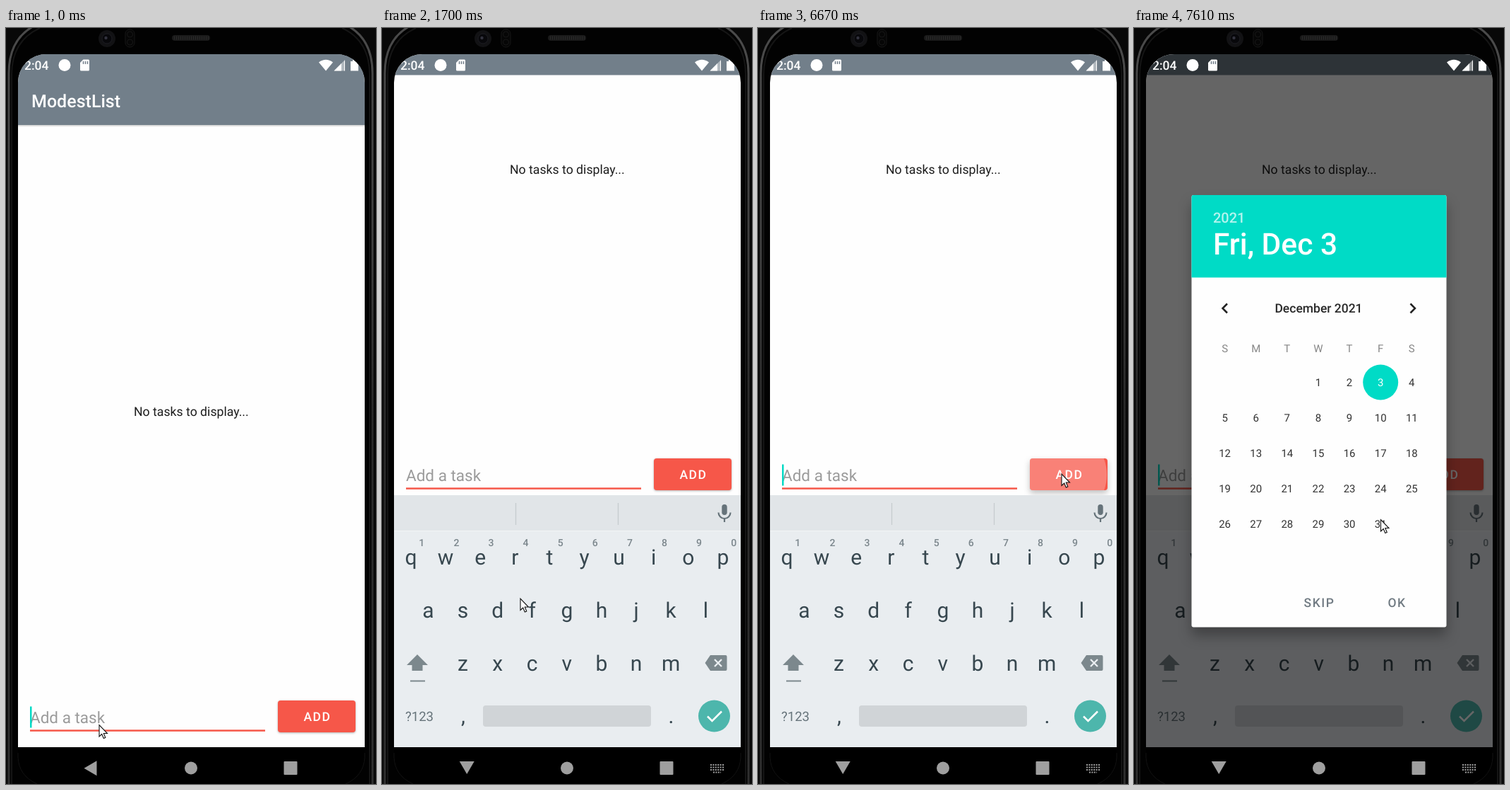
An HTML page for the animation above (8000 ms loop, 524 by 1068 pixels).

```html
<!DOCTYPE html>
<html lang="en">
<head>
<meta charset="utf-8">
<title>Task list demo</title>
<style>
  html, body { margin: 0; width: 100%; height: 100%; overflow: hidden; background: #000; }
  svg { display: block; width: 100vw; height: 100vh; }
  text { font-family: Roboto, "Noto Sans", sans-serif; white-space: pre; text-rendering: geometricPrecision; }
  .mid { text-anchor: middle; }
  .medium { font-weight: 500; }
  .button { font-size: 17.5px; font-weight: 500; letter-spacing: 1.56px; }
  .field { font-size: 22.5px; }
  .key { font-size: 30px; fill: #37474f; }
  .digit { font-size: 14px; font-weight: 500; fill: #7b868c; }
  .suggestion { font-size: 22.5px; fill: #7c878c; }
  .best { font-weight: 700; fill: #505c62; }
  .day { font-size: 15px; fill: #333; }
  .weekday { font-size: 15px; fill: #878787; }
  #addBox { filter: drop-shadow(0 1.5px 1.5px rgba(0,0,0,.3)); }
  #addBox.raised { filter: drop-shadow(0 4px 4px rgba(0,0,0,.25)); }
  #sheet { filter: drop-shadow(0 12px 9px rgba(0,0,0,.3)); }
</style>
</head>
<body>
<svg viewBox="0 0 524 1068" preserveAspectRatio="none">
  <defs>
    <clipPath id="screen"><path d="M17 1016V77A40 40 0 0 1 57 37H468A40 40 0 0 1 508 77V1016Z"/></clipPath>
    <clipPath id="addClip"><rect x="385" y="950" width="110" height="45" rx="4"/></clipPath>
    <linearGradient id="edge" x2="0" y2="1068" gradientUnits="userSpaceOnUse">
      <stop stop-color="#4a4a4a"/><stop offset=".3" stop-color="#404040"/>
      <stop offset=".5" stop-color="#2a2a2a"/><stop offset="1" stop-color="#303030"/>
    </linearGradient>
    <linearGradient id="toolbarShade" x2="0" y2="1">
      <stop stop-color="#000" stop-opacity=".2"/><stop offset="1" stop-opacity="0"/>
    </linearGradient>
  </defs>

  <!-- Phone body -->
  <rect width="524" height="1068" fill="#080808"/>
  <path d="M4 1080V64Q4 12 46 -6H478Q519 12 519 64V1080" fill="#020202" stroke="url(#edge)" stroke-width="3"/>
  <path d="M8 1080V66Q8 18 48 0M515 1080V66Q515 18 476 0" fill="none" stroke="#151515" stroke-width="2"/>
  <circle cx="143" cy="15" r="12" fill="#121214"/>
  <circle cx="143" cy="15" r="7" fill="#08080b" stroke="#1d1d23"/>
  <circle cx="141.5" cy="14" r="2.2" fill="#32323e"/>
  <rect x="169" y="2" width="13" height="25" rx="6" fill="#060606" stroke="#161616"/>
  <circle cx="175.5" cy="9" r="4" fill="none" stroke="#181818"/>
  <circle cx="175.5" cy="20" r="4" fill="none" stroke="#181818"/>
  <rect x="235" y="10" width="54" height="8" rx="4" fill="#1a1a1a"/>
  <path d="M238 14H287" stroke="#2a2a2a" stroke-width="5" stroke-dasharray="1 2"/>
  <path d="M17 1016V1030Q18 1056 44 1068H481Q507 1056 508 1030V1016Z" fill="#000"/>
  <path d="M17 1024V1030Q18 1056 44 1068M481 1068Q507 1056 508 1030V1024" fill="none" stroke="#121212"/>

  <g clip-path="url(#screen)">
    <rect x="17" y="37" width="491" height="979" fill="#fefefe"/>
    <g id="app">
      <rect x="17" y="37" width="491" height="100" fill="#727f8a"/>
      <rect x="17" y="137" width="491" height="3" fill="url(#toolbarShade)"/>
      <text x="36" y="112" class="medium" font-size="25" fill="#fff">ModestList</text>
      <text x="262.3" y="548" class="mid" font-size="17.7" fill="#1d1d1d">No tasks to display...</text>
      <text id="hint" x="34" y="982" class="field" fill="#9b9b9b">Add a task</text>
      <text id="typed" x="34" y="982" class="field" fill="#212121"></text>
      <rect id="composing" x="34" y="985" height="1.3" fill="#444"/>
      <rect x="34" y="991.3" width="333" height="2.5" fill="#f65749"/>
      <rect id="caret" y="958.5" width="2.5" height="30" fill="#03dac5"/>
      <rect id="addBox" x="385" y="950" width="110" height="45" rx="4" fill="#f65749"/>
      <circle id="ripple" cx="430" cy="973" fill="#fff" clip-path="url(#addClip)"/>
      <text x="441" y="979" class="mid button" fill="#fff">ADD</text>
    </g>

    <g id="keyboard">
      <rect x="17" y="660" width="491" height="356" fill="#e9edf0"/>
      <rect x="17" y="660" width="491" height="50" fill="#e1e5e8"/>
      <path d="M17 710.5H508" stroke="#f3f5f6"/>
      <path d="M189.5 671V702M334.5 671V702" stroke="#c6cbce" stroke-width="1.3"/>
      <g id="suggestions"></g>
      <g id="dots" fill="#505c62">
        <circle cx="255" cy="706.5" r="1.9"/><circle cx="261.5" cy="706.5" r="1.9"/><circle cx="268" cy="706.5" r="1.9"/>
      </g>
      <rect x="481.3" y="673" width="7.4" height="15" rx="3.7" fill="#66737a"/>
      <path d="M476.5 684.5A8.5 8.5 0 0 0 493.5 684.5M485 693V698" fill="none" stroke="#66737a" stroke-width="2.2"/>
      <g id="keys"></g>
      <path d="M50 885L65 900H57.5V908H42.5V900H35Z" fill="#7c888d"/>
      <path d="M40 922.5H61" stroke="#7c888d" stroke-width="2"/>
      <path d="M457.5 897L465 886H486.5Q488.5 886 488.5 888V906Q488.5 908 486.5 908H465Z" fill="#7c888d"/>
      <path d="M471 892L481 902M481 892L471 902" stroke="#e9edf0" stroke-width="2.4"/>
      <text x="53" y="979" class="mid" font-size="18.5" fill="#66737a">?123</text>
      <rect x="143" y="957" width="238" height="30" rx="4" fill="#d0d4d7"/>
      <circle cx="470.5" cy="972" r="22.5" fill="#4db6ac"/>
      <path d="M461 972.5L467.5 979L481 965.5" fill="none" stroke="#fff" stroke-width="2.5"/>
    </g>

    <rect x="17" y="37" width="491" height="29.5" fill="#727f8a"/>
    <rect id="dim" x="17" y="37" width="491" height="979"/>
    <g fill="#fff">
      <text x="26" y="59" class="medium" font-size="17.5">2:04</text>
      <circle cx="83" cy="52.5" r="8.5"/>
      <path d="M109.5 44.5H116.5Q118 44.5 118 46V59Q118 60.5 116.5 60.5H106.5Q105 60.5 105 59V49Z"/>
      <path d="M109.5 47V51M112.5 47V51M115.5 47V51" stroke="#727f8a" stroke-width="1.5"/>
      <path d="M443 48.5Q453 41 463 48.5L453 60.5Z"/>
      <path d="M464.5 60.5L480 45V60.5Z" fill-opacity=".45"/>
      <path d="M464.5 60.5L475 50V60.5ZM479 47.5V60.5H480V45Z"/>
      <path d="M488 47H491V45H496V47H499V60.5H488Z"/>
    </g>

    <g id="dialog">
      <rect id="sheet" x="81.5" y="236" width="361" height="610.5" rx="3" fill="#fefefe"/>
      <path d="M81.5 352.5V239Q81.5 236 84.5 236H439.5Q442.5 236 442.5 239V352.5Z" fill="#00dbc6"/>
      <text x="112" y="274.5" class="medium" font-size="20" fill="#fff" fill-opacity=".7">2021</text>
      <text x="112" y="320" class="medium" font-size="42.5" fill="#fff">Fri, Dec 3</text>
      <g id="calendar">
        <path d="M132 389.5L125.5 396L132 402.5M391.5 389.5L398 396L391.5 402.5" fill="none" stroke="#222" stroke-width="2.5"/>
        <text x="261.5" y="401.5" class="mid medium" font-size="17.5" fill="#2a2a2a">December 2021</text>
        <circle cx="349.2" cy="500.5" r="25" fill="#00dbc6"/>
        <g id="days"></g>
      </g>
      <text x="262.5" y="818" class="mid button" fill="#717b83">SKIP</text>
      <text x="372.5" y="818" class="mid button" fill="#717b83">OK</text>
    </g>
  </g>

  <!-- Navigation bar -->
  <g fill="#9f9f9f">
    <path id="back" d="M109.7 1036H130.7L120.2 1054Z"/>
    <circle cx="262" cy="1045.5" r="9"/>
    <rect x="393.5" y="1036" width="19" height="19" rx="1"/>
    <path id="keyboardIcon" d="M465 1041H484M465 1044.5H484M465 1048H484M469 1051.5H480" stroke="#9f9f9f" stroke-width="2" stroke-dasharray="2 1.4"/>
  </g>
  <path id="pointer" d="M0 0V16.5L3.7 13L6.3 19L8.8 18L6.3 12H11.5Z" fill="#fff" stroke="#111" stroke-width="1.1"/>
</svg>
<script>
const LOOP = 8000;
const $ = id => document.getElementById(id);
const set = (id, attrs) => {
  for (const name in attrs) $(id).setAttribute(name, attrs[name]);
};
const show = (id, visible) => { $(id).style.display = visible ? '' : 'none'; };
const label = (x, y, cls, text, extra = '') =>
  `<text x="${x}" y="${y}" class="mid ${cls}" ${extra}>${text}</text>`;

const row = (letters, x, y) =>
  [...letters].map((c, i) => label(x + i * 49.1, y, 'key', c)).join('');
$('keys').innerHTML = row('qwertyuiop', 41, 758) + row('asdfghjkl', 65.5, 833) +
  row('zxcvbnm', 114.5, 908) + label(115, 982, 'key', ',') + label(409.5, 982, 'key', '.') +
  [...'1234567890'].map((c, i) => label(56.3 + i * 49.1, 731.5, 'digit', c)).join('');

const column = i => 128.6 + i * 44.12;
let days = [...'SMTWTFS'].map((c, i) => label(column(i), 458, 'weekday', c)).join('');
for (let day = 1; day <= 31; day++) {
  const cell = day + 2;
  days += label(column(cell % 7), 505.8 + 50 * Math.floor(cell / 7), 'day', day,
    day === 3 ? 'style="fill:#fff"' : '');
}
$('days').innerHTML = days;

// The screen refreshes only at these moments.
const refreshes = [0, 120, 240, 390, 510, 660, 780, 930, 1050, 1300, 1700, 1830, 1980, 2110,
  2250, 2400, 2550, 2720, 3250, 3560, 3870, 4000, 4140, 4540, 4910, 5040, 5170, 5300, 5440,
  5570, 5880, 6430, 6670, 6790, 6910, 7060, 7340, 7480, 7610];

// [time, text, suggestions, is the word still being composed]
const typing = [
  [0, '', []],
  [2250, 't', ['to', 't', 'the'], true],
  [2400, 'ta', ['take', 'ta', 'tab'], true],
  [2720, 'tas', ['task', 'tas', 'tax'], true],
  [3560, 'task', ['tasks', 'task', 'tasked'], true],
  [3870, 'task ', ['force', 'is', 'for']],
  [4000, 'task 1', []],
  [6670, '', []]
];
const caretOff = [[240, 780], [1300, 1830], [3250, 3560], [4540, 5040], [5440, 5880], [6430, 6670]];

const latest = (list, t, time = x => x) => list.filter(item => time(item) <= t).pop();

function track(t, points) {
  const next = points.findIndex(p => p[0] > t);
  if (next < 0) return points[points.length - 1].slice(1);
  if (next === 0) return points[0].slice(1);
  const [from, to] = [points[next - 1], points[next]];
  const k = (t - from[0]) / (to[0] - from[0]);
  return from.slice(1).map((v, i) => v + (to[i + 1] - v) * k);
}

function draw(t) {
  const [pan] = track(t, [[120, 0], [240, 110], [390, 305], [510, 341], [660, 342]]);
  const [drop] = track(t, [[120, 356], [240, 150], [390, 12], [510, 0]]);
  const [turn] = track(t, [[120, 90], [390, 22], [510, 4], [660, 0]]);
  set('app', { transform: `translate(0 ${-pan})` });
  set('keyboard', { transform: `translate(0 ${drop})` });
  set('back', { transform: `rotate(${turn} 119.5 1045)` });
  show('keyboardIcon', t >= 390);

  const [, text, words, composing] = latest(typing, t, item => item[0]);
  $('typed').textContent = text;
  const width = text ? $('typed').getComputedTextLength() : 0;
  show('hint', !text);
  set('composing', { width: composing ? width : 0 });
  show('dots', composing);
  $('suggestions').innerHTML = words.map((word, i) =>
    label([125, 261.5, 398.5][i], 695, i === 1 ? 'suggestion best' : 'suggestion', word)).join('');
  set('caret', { x: 34 + width });
  show('caret', !caretOff.some(([from, to]) => t >= from && t < to));

  const pressed = t >= 6430 && t < 6910;
  const [radius, glow] = track(t, [[6430, 18, .25], [6670, 64, .25], [6790, 80, .14]]);
  $('addBox').classList.toggle('raised', pressed);
  set('ripple', { r: pressed ? radius : 0, opacity: glow });

  const [dim, sheet, calendar] =
    track(t, [[6670, 0, 0, 0], [6790, .2, .54, .27], [6910, .42, .93, .75], [7060, .6, 1, 1]]);
  set('dim', { opacity: dim });
  set('dialog', { opacity: sheet });
  set('calendar', { opacity: calendar });

  const [x, y] = track(t, [[0, 132, 984.5], [510, 131, 984], [1050, 193, 815], [1300, 193, 815],
    [1700, 196, 806], [2250, 232.5, 758.5], [4780, 232.5, 758.5], [5570, 430, 630],
    [7060, 430, 630], [7610, 349.5, 694.5]]);
  set('pointer', { transform: `translate(${x} ${y})` });
}

let shown = -1;
const start = performance.now();
function tick(now) {
  const moment = latest(refreshes, Math.max(0, now - start) % LOOP);
  if (moment !== shown) draw(shown = moment);
  requestAnimationFrame(tick);
}
draw(shown = 0);
requestAnimationFrame(tick);
</script>
</body>
</html>
```
